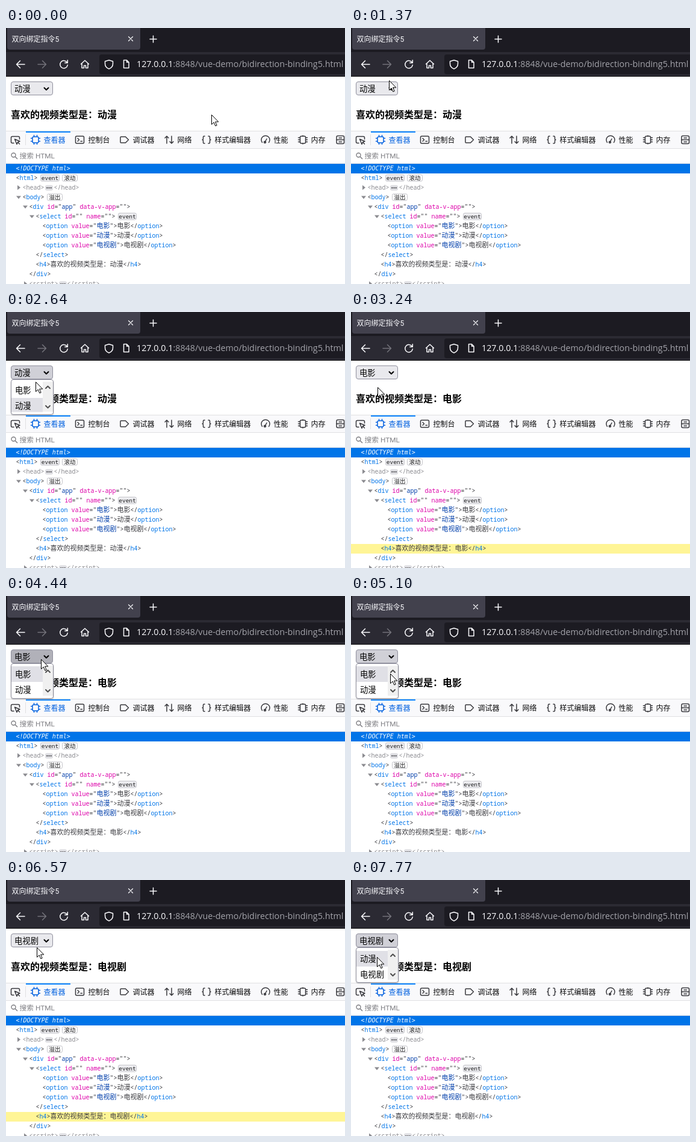
Write an HTML page that moves like this. It is 563x426 px and loops after 8000 ms.

```html
<!DOCTYPE html>
<html lang="zh-CN">
<head>
<meta charset="utf-8">
<title>双向绑定指令5</title>
<style>
  html, body { margin: 0; width: 100%; height: 100%; overflow: hidden; background: #fff; }
  svg { display: block; width: 563px; height: 426px; }
  text { white-space: pre; font-family: Roboto, "Noto Sans CJK SC", "Noto Sans CJK", sans-serif; }
  .line { fill: none; stroke: currentColor; stroke-width: 1.5; stroke-linecap: round; stroke-linejoin: round; }
  .url { font: 14.3px "Open Sans", sans-serif; fill: #fbfbfe; }
  .form { font-size: 13.33px; fill: #000; }
  .tab { font-size: 12px; fill: #0c0c0d; }
  .code text { font: 10px "Noto Sans Mono", "Noto Sans CJK SC", "Noto Sans CJK", monospace; fill: #38383d; }
  .code .cjk { font-size: 11px; }
  .code .tag { fill: #0074e8; }
  .code .attr { fill: #dd00a9; }
  .code .val { fill: #003eaa; }
  .code .dim, .code .dim tspan { fill: #8c8c91; }
  .code .badge { font-size: 9.5px; fill: #18181a; }
  .code .doctype { font: italic 10px "DejaVu Sans Mono", monospace; fill: #fff; }
</style>
</head>
<body>
<svg viewBox="0 0 563 426">
  <rect width="563" height="426" fill="#fff"/>

  <!-- browser chrome -->
  <rect width="563" height="40" fill="#1c1b22"/>
  <rect x="2" y="-6" width="221" height="42" rx="4" fill="#42414d"/>
  <text x="9.5" y="23" font-size="12" fill="#fbfbfe">双向绑定指令5</text>
  <g class="line" color="#fbfbfe">
    <path d="M203.5 14.5l7 7m0-7l-7 7" stroke-width="1.2"/>
    <path d="M239 18.500h11m-5.500-5.500v11"/>
  </g>
  <rect y="40" width="563" height="40" fill="#2b2a33"/>
  <rect y="80" width="563" height="1" fill="#0c0c0d"/>
  <rect x="155" y="44" width="420" height="33" rx="4" fill="#1c1b22"/>
  <g class="line" color="#fbfbfe">
    <path d="M31 60.500H17.500m6-6l-6 6 6 6"/>
    <path d="M53 60.500h13.500m-6-6l6 6-6 6" style="color:#73727a"/>
    <path d="M101.500 57.500a6.300 6.300 0 1 0 .8 4M102.300 53.500v4.500h-4.500"/>
    <path d="M124.500 60l6.500-6 6.500 6M126 59v7.500h3.500v-4h3v4h3.500V59"/>
    <path d="M171 53.500l6.500 2v4c0 4-2.500 7-6.500 8.500-4-1.500-6.500-4.500-6.500-8.500v-4z"/>
    <path d="M195.500 53.500h5l3.500 3.500v9.500h-8.500zM200.500 53.500v3.500h3.500"/>
  </g>
  <text class="url" x="217" y="65">127.0.0.1<tspan fill="#a3a3aa">:8848/vue-demo/bidirection-binding5.html</tspan></text>

  <!-- page -->
  <rect id="box" x="8.500" y="89.500" width="69" height="22" rx="3.500" stroke="#8f8f9d"/>
  <path class="line" d="M63.500 99.500l3.500 3.500 3.500-3.500" style="stroke-width:2"/>
  <text id="picked" class="form" x="14" y="105.500"></text>
  <text id="title" x="8" y="150" font-size="16" font-weight="700"></text>

  <!-- inspector -->
  <rect y="171" width="563" height="30" fill="#f9f9fb"/>
  <path d="M0 171.500h563M0 200.500h563M0 225.500h563M32.500 177v18" stroke="#e0e0e2"/>
  <rect x="33" y="172" width="74" height="2" fill="#0a84ff"/>
  <g id="tabs"></g>
  <g class="line" color="#38383d">
    <path d="M13 191.500h-2.500a2 2 0 0 1-2-2v-7a2 2 0 0 1 2-2h10a2 2 0 0 1 2 2v2.500M14.500 185l8.500 3.500-3.500 1.500-1.500 3.500zM19.500 190l3 3"/>
    <path color="#0060df" d="M46 181h6a2 2 0 0 1 2 2v6a2 2 0 0 1-2 2h-6a2 2 0 0 1-2-2v-6a2 2 0 0 1 2-2zM46.500 178.500v2.500m5-2.500v2.500m-5 10v2.500m5-2.500v2.500M41.500 183.500h2.500m-2.500 5h2.500m10-5h2.500m-2.500 5h2.500"/>
    <rect x="115.500" y="180" width="14" height="12" rx="2"/><path d="M119 183.500l2.500 2.500-2.500 2.500m5 0h2.500"/>
    <path d="M191 181h7.500l5 5-5 5H191a1 1 0 0 1-1-1v-8a1 1 0 0 1 1-1z"/>
    <path d="M267 192v-12l-3 3m3-3l3 3M275 180v12l-3-3m3 3l3-3"/>
    <path d="M330 180h-1q-1.500 0-1.500 1.500v2.500q0 2-1.500 2 1.500 0 1.500 2v2.500q0 1.500 1.500 1.500h1M336 180h1q1.500 0 1.500 1.500v2.500q0 2 1.500 2-1.500 0-1.500 2v2.500q0 1.500-1.500 1.500h-1"/>
    <path d="M425.500 190.500a7 7 0 1 1 11 0M430 190l3-5.500"/><circle cx="430" cy="190" r="1.500"/>
    <rect x="488.500" y="180" width="9" height="12" rx="2"/><path d="M485.500 182.500h2.500m-2.500 3.500h2.500m-2.500 3.500h2.500m10-7h2.500m-2.500 3.500h2.500m-2.500 3.500h2.500M493 180v-1m0 14v-1"/>
    <rect x="549" y="179.500" width="12.500" height="13" rx="2"/><path d="M549 186h12.500m-8.500-3h4.500m-4.500 6.500h4.500"/>
  </g>
  <circle cx="12.500" cy="211.500" r="3.500" fill="none" stroke="#808085" stroke-width="1.400"/>
  <path d="M15 214l4 4" stroke="#808085" stroke-width="1.600"/>
  <text x="22.500" y="217" font-size="11.800" fill="#808085">搜索 HTML</text>
  <rect y="226" width="563" height="16" fill="#0074e8"/>
  <rect id="flash" y="386" width="563" height="16" fill="#fff596"/>
  <g id="code" class="code">
    <text class="doctype" x="16.500" y="237">&lt;!DOCTYPE html&gt;</text>
  </g>

  <!-- drop-down list -->
  <clipPath id="view"><rect x="9" y="116" width="52" height="50.500"/></clipPath>
  <g id="popup">
    <rect x="7.500" y="113" width="72.500" height="60" rx="5" fill="#000" opacity=".12"/>
    <rect x="8.500" y="112.500" width="70" height="58" rx="3.500" fill="#fff" stroke="#8f8f9d"/>
    <g clip-path="url(#view)"><g id="list"><rect id="hot" x="9" width="52" height="26" fill="#e0e0e6"/></g></g>
    <rect x="61" y="116" width="17" height="50" fill="#f0f0f0"/>
    <rect id="press" x="61" y="149" width="17" height="17" fill="#dadada"/>
    <path class="line" d="M66 127l3.500-3.500 3.500 3.500M66 156l3.500 3.500 3.500-3.500" style="stroke-width:2;color:#505050"/>
  </g>

  <path id="mouse" d="M.5-.5v16l3.700-3.500 2.600 6 2.400-1-2.600-5.900h5.200z" fill="#fff" stroke="#000"/>
</svg>
<script>
const $ = id => document.getElementById(id);

function add(parent, name, attrs, text) {
  const node = document.createElementNS('http://www.w3.org/2000/svg', name);
  for (const key in attrs) node.setAttribute(key, attrs[key]);
  if (text) node.textContent = text;
  return parent.appendChild(node);
}

const films = ['电影', '动漫', '电视剧'];
films.forEach((name, i) => add($('list'), 'text', { class: 'form', x: 15, y: 135 + 26 * i }, name));

[[63, '查看器'], [137, '控制台'], [211, '调试器'], [285, '网络'], [347, '样式编辑器'], [445, '性能'], [507, '内存']]
  .forEach(([x, name], i) => add($('tabs'), 'text',
    { class: 'tab', x: x - .5, y: 190.5, style: i ? '' : 'fill:#0060df' }, name));

// Markup tree
const code = $('code');
const rowMid = row => 233.5 + 16 * row;

function markup(row, x, source, cls = '') {
  const line = add(code, 'text', { x: x - .5, y: rowMid(row) + 3.5, class: cls });
  let prev = '';
  for (const part of source.match(/[一-龥：]+|<\/?|>|="|"|[\w-]+| /g)) {
    const kinds = [];
    if (/[一-龥]/.test(part)) kinds.push('cjk');
    if (prev === '="' && part !== '"') kinds.push('val');
    else if (/^\w/.test(part)) kinds.push(prev[0] === '<' ? 'tag' : 'attr');
    add(line, 'tspan', { class: kinds.join(' ') }, part);
    prev = part;
  }
  return line;
}

function badge(row, x, width, label, fill = '#fff') {
  const y = rowMid(row) - 6;
  add(code, 'rect', { x: x + .5, y: y + .5, width, height: 11, rx: 2.5, fill, stroke: '#c4c4ca' });
  add(code, 'text', { class: 'badge', x: x + .5 + width / 2, y: y + 9.2, 'text-anchor': 'middle' }, label);
}

function dots(row, x) {
  const y = rowMid(row);
  add(code, 'rect', { x, y: y - 4, width: 13, height: 9, rx: 3, fill: '#dedee2' });
  for (let i = 0; i < 3; i++) add(code, 'circle', { cx: x + 3.3 + 3.2 * i, cy: y + .5, r: 1.1, fill: '#38383d' });
}

function twisty(row, x, open) {
  const d = open ? 'M-4 -2h8l-4 5z' : 'M-2 -4v8l5 -4z';
  add(code, 'path', { d, fill: '#8b8b90', transform: `translate(${x} ${rowMid(row)})` });
}

markup(1, 17, '<html>');
badge(1, 57, 31, 'event', '#ededf0');
badge(1, 93, 25, '滚动');
twisty(2, 21, false);
markup(2, 28, '<head>', 'dim');
dots(2, 65);
markup(2, 80, '</head>', 'dim');
twisty(3, 21, true);
markup(3, 28, '<body>');
badge(3, 68, 25, '溢出');
twisty(4, 32, true);
markup(4, 39, '<div id="app" data-v-app="">');
twisty(5, 43, true);
markup(5, 50, '<select id="" name="">');
badge(5, 186, 30, 'event', '#ededf0');
films.forEach((name, i) => markup(6 + i, 61, `<option value="${name}">${name}</option>`));
markup(9, 50, '</select>');
const treeTitle = markup(10, 50, '<h4>动漫</h4>').querySelector('.cjk');
markup(11, 39, '</div>');
twisty(12, 32, false);
markup(12, 39, '<script>', 'dim');
dots(12, 88);
markup(12, 102, '<\/script>', 'dim');

// Timeline: [ms, value...]
const idle = '#e9e9ed', hover = '#d0d0d7', active = '#b1b1b9';
const fills = [[0, idle], [1440, hover], [1770, active], [1970, hover], [3170, idle], [4240, hover],
  [4300, active], [4500, hover], [5700, idle], [6640, hover], [6970, active], [7240, hover]];
const opens = [[0, 0], [1840, 1], [3170, 0], [4370, 1], [6100, 0], [7040, 1]];
const picks = [[0, 1], [3170, 0], [6100, 2]];
const hots = [[0, 1], [2700, 0], [5840, 2], [7570, 1]];
const flashes = [[0, 0], [3240, 1], [3700, 0], [6170, 1], [6640, 0]];
const presses = [[0, 0], [5440, 1], [5840, 0]];
const scrolls = [[0, 0], [5370, 0], [5570, 28], [6970, 28], [7040, 25]];
const path = [[0, 341, 145], [440, 341, 145], [500, 331, 145], [570, 324, 144], [840, 324, 144],
  [970, 280, 148], [1100, 190, 150], [1240, 115, 125], [1370, 63, 88], [1570, 58, 97], [1770, 58, 97],
  [1970, 58, 98], [2570, 50, 116], [2640, 49, 117], [2900, 44, 126], [3900, 44, 126], [4240, 57, 100],
  [4440, 58, 106], [4500, 58, 108], [4700, 58, 108], [5100, 65, 130], [5570, 64, 150], [5640, 64, 150],
  [5770, 62, 150], [5900, 47, 150], [6300, 47, 150], [6570, 51, 113], [6700, 54, 102], [7370, 54, 102],
  [7770, 43, 129]];

const held = (keys, t) => keys.filter(key => key[0] <= t).pop()[1];

function eased(keys, t, n = 1) {
  const next = keys.findIndex(key => key[0] > t);
  if (next < 0) return keys[keys.length - 1][n];
  const a = keys[next - 1], b = keys[next];
  return a[n] + (b[n] - a[n]) * (t - a[0]) / (b[0] - a[0]);
}

// The screen refreshes 15 times a second, on 10 ms marks.
function tick(t) {
  const step = 1000 / 15;
  const k = Math.floor((t - 33.3) / step);
  return k < 0 ? 0 : Math.ceil((33.33 + k * step) / 10 - .01) * 10;
}

function show(node, on) { node.style.display = on ? '' : 'none'; }

function draw(now) {
  const t = tick(now % 8000);
  const name = films[held(picks, t)];
  $('box').setAttribute('fill', held(fills, t));
  $('picked').textContent = name;
  $('title').textContent = treeTitle.textContent = '喜欢的视频类型是：' + name;
  show($('flash'), held(flashes, t));
  show($('popup'), held(opens, t));
  show($('press'), held(presses, t));
  $('hot').setAttribute('y', 117 + 26 * held(hots, t));
  $('list').setAttribute('transform', `translate(0 ${-eased(scrolls, t)})`);
  const x = Math.round(eased(path, t)), y = Math.round(eased(path, t, 2));
  $('mouse').setAttribute('transform', `translate(${x} ${y})`);
}

const start = performance.now();
function loop() {
  draw(performance.now() - start);
  requestAnimationFrame(loop);
}
loop();
</script>
</body>
</html>
```
